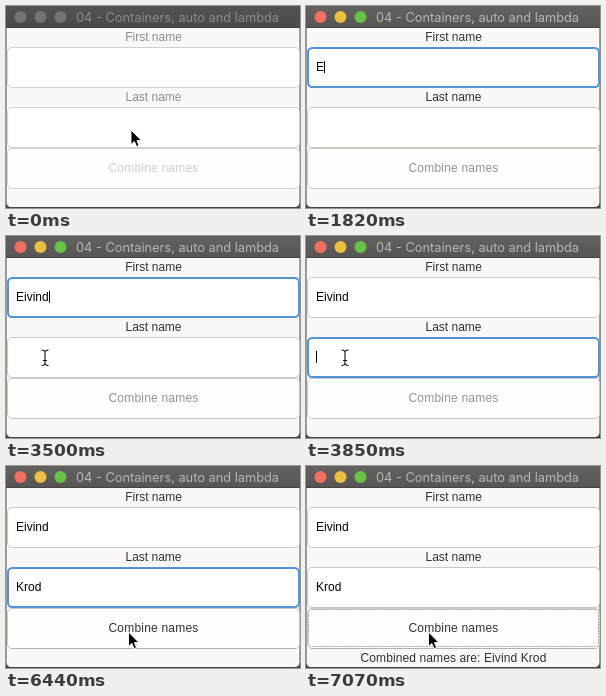
Animation, 294 px wide and 202 px high, one loop 8.05 s. Source, as an HTML page:

```html
<!DOCTYPE html>
<html lang="en">
<head>
<meta charset="utf-8">
<title>Containers, auto and lambda</title>
<style>
  html, body { margin: 0; width: 100%; height: 100%; overflow: hidden; background: #4a4541; }
  svg { display: block; width: 294px; height: 202px; }
  text { font: 12px "Liberation Sans", Arial, sans-serif; white-space: pre; }
  .mid { text-anchor: middle; }
  #title { font: 12.8px Inter, sans-serif; }
  #push { letter-spacing: .2px; }
  #result { letter-spacing: .1px; }
</style>
</head>
<body>
<svg viewBox="0 0 294 202">
  <defs>
    <linearGradient id="bar" x2="0" y2="1">
      <stop id="barTop" offset="0"/><stop id="barEnd" offset="1"/>
    </linearGradient>
    <linearGradient id="face" x2="0" y2="1">
      <stop id="faceTop" offset="0"/><stop id="faceEnd" offset="1"/>
    </linearGradient>
  </defs>
  <rect width="294" height="202" fill="#4a4541"/>
  <path d="M.5 20H293.5V196.5a4.5 4.5 0 0 1-4.5 4.5H5a4.5 4.5 0 0 1-4.5-4.5Z" fill="#f9f8f7"/>
  <rect width="294" height="22" fill="url(#bar)"/>
  <path d="M0 21.5H294" stroke="#454341"/>
  <circle id="close" cx="14.5" cy="11" r="6"/>
  <circle id="mini" cx="34.5" cy="11" r="6"/>
  <circle id="zoom" cx="54.5" cy="11" r="6"/>
  <text id="title" x="70" y="16">04 - Containers, auto and lambda</text>

  <text id="label1" class="mid" x="147.5" y="35">First name</text>
  <rect id="box1" x="1.5" y="41.5" width="292" height="40" rx="4.5" fill="#fff"/>
  <rect id="ring1" x="2" y="42" width="291" height="39" rx="4.5" fill="none" stroke="#5294d6" stroke-width="2"/>
  <text id="first" x="10" y="65"></text>

  <text id="label2" class="mid" x="147.5" y="95">Last name</text>
  <rect id="box2" x="1.5" y="101.5" width="292" height="40" rx="4.5" fill="#fff"/>
  <rect id="ring2" x="2" y="102" width="291" height="39" rx="4.5" fill="none" stroke="#5294d6" stroke-width="2"/>
  <text id="last" x="10" y="125"></text>

  <rect id="button" x="1.5" y="142.5" width="292" height="40" rx="4.5" fill="url(#face)"/>
  <path id="edge" d="M5 182.5H290" stroke="#b8b1aa"/>
  <rect id="dash" x="2.5" y="143.5" width="290" height="37" rx="3" fill="none" stroke="#a4a4a2" stroke-dasharray="2 1"/>
  <text id="push" class="mid" x="147.5" y="165.5">Combine names</text>
  <text id="result" class="mid" x="147.5" y="195.5" fill="#2e3436"></text>

  <path id="caret" stroke="#000"/>
  <path id="arrow" d="M0 0V14.6L3.4 11.5 5.6 16.6 8.1 15.5 5.9 10.6H10.4Z" fill="#000" stroke="#fff" stroke-width=".9"/>
  <g id="beam" fill="none">
    <path d="M-3.5-7.5Q0-7.5 0-5Q0-7.5 3.5-7.5M0-5V5.5M-2 3H2M-3.5 8Q0 8 0 5.5Q0 8 3.5 8" stroke="#fff" stroke-width="2.6"/>
    <path d="M-3.5-7.5Q0-7.5 0-5Q0-7.5 3.5-7.5M0-5V5.5M-2 3H2M-3.5 8Q0 8 0 5.5Q0 8 3.5 8" stroke="#111" stroke-width="1.1"/>
  </g>
</svg>
<script>
const LOOP = 8050, STEP = 70;
const FIRST = "Eivind", LAST = "Krod";
const firstKeys = [1820, 2030, 2100, 2240, 2450, 2520];
const lastKeys = [4550, 4760, 4900, 5040];

const el = {};
document.querySelectorAll("[id]").forEach(e => el[e.id] = e);

const clamp = v => Math.max(0, Math.min(1, v));
const ease = v => v * v * (3 - 2 * v);
const lerp = (a, b, k) => a + (b - a) * k;
const within = (t, a, b) => t >= a && t < b;
// Fade that already shows its first step at time a
const fade = (t, a, b) => clamp((t - a + STEP) / (b - a + STEP));

function mix(a, b, k) {
  const part = (c, i) => parseInt(c.slice(i, i + 2), 16);
  return `rgb(${[1, 3, 5].map(i => Math.round(lerp(part(a, i), part(b, i), k)))})`;
}

const set = (id, name, value) => el[id].setAttribute(name, value);
const show = (id, k) => set(id, "opacity", +k);
const typed = (word, keys, t) => word.slice(0, keys.filter(k => k <= t).length);

function bezier(p, k) {
  const j = 1 - k;
  return [0, 1].map(i =>
    j * j * j * p[0][i] + 3 * j * j * k * p[1][i] + 3 * j * k * k * p[2][i] + k ** 3 * p[3][i]);
}

function pointer(t) {
  if (t < 1820) {
    const k = ease(fade(t, 70, 490));
    return [lerp(125, 90, k), lerp(124, 66, k)];
  }
  if (t < 4550) {
    const k = ease(clamp((t - 2940) / 560));
    return [lerp(90, 39, k), lerp(66.5, 121.5, k)];
  }
  const k = ease(clamp((t - 5740) / 700));
  return bezier([[39, 121], [10, 146], [70, 166], [122.5, 166]], k);
}

function drawCaret(t) {
  const on = within(t, 910, 6860) && !within(t, 6300, 6720);
  show("caret", on);
  if (!on) return;
  const second = t >= 3640;
  const field = second ? el.last : el.first;
  const w = field.textContent ? field.getComputedTextLength() : 0;
  const x = Math.round(10 + w) + .5, y = second ? 115 : 55;
  set("caret", "d", `M${x} ${y}v12`);
}

function drawPointer(t) {
  const [x, y] = pointer(t);
  const visible = t < 1820 || within(t, 2940, 4550) || t >= 5740;
  const isBeam = within(t, 910, 4550) || (t >= 5740 && y < 142);
  for (const id of ["arrow", "beam"]) {
    show(id, visible && (id === "beam") === isBeam);
    set(id, "transform", `translate(${x.toFixed(2)} ${y.toFixed(2)})`);
  }
}

function draw(t) {
  const awake = fade(t, 910, 1050);
  const swap = fade(t, 3640, 3850);
  const ready = fade(t, 4550, 4760);
  const hover = fade(t, 6090, 6300);
  const press = fade(t, 6860, 7070);

  set("barTop", "stop-color", mix("#54514f", "#636261", awake));
  set("barEnd", "stop-color", mix("#4b4846", "#565554", awake));
  set("close", "fill", mix("#757270", "#f1705f", awake));
  set("mini", "fill", mix("#757270", "#eabf42", awake));
  set("zoom", "fill", mix("#757270", "#68c148", awake));
  set("title", "fill", mix("#8d8a87", "#b9b7b5", awake));

  for (const id of ["label1", "label2"]) set(id, "fill", mix("#8b8e8f", "#2e3436", awake));
  for (const id of ["box1", "box2"]) set(id, "stroke", mix("#d5d0cc", "#cdc7c2", awake));
  show("ring1", awake * (1 - swap));
  show("ring2", swap * (1 - press));

  el.first.textContent = typed(FIRST, firstKeys, t);
  el.last.textContent = typed(LAST, lastKeys, t);

  const lit = ready * (1 - hover);
  set("faceTop", "stop-color", mix("#fefefe", "#f6f5f4", lit));
  set("faceEnd", "stop-color", mix("#fdfdfd", "#efedec", lit));
  set("button", "stroke", mix("#d5d0cc", "#cdc7c2", awake));
  show("edge", ready);
  show("dash", press);
  set("push", "fill", ready ? mix("#929595", "#2e3436", ready) : mix("#d2cdca", "#929595", awake));
  el.result.textContent = t >= 6930 ? `Combined names are: ${FIRST} ${LAST}` : "";

  drawCaret(t);
  drawPointer(t);
}

let start;
function tick(now) {
  start ??= now;
  const t = (now - start) % LOOP;
  draw(Math.floor(t / STEP) * STEP);
  requestAnimationFrame(tick);
}
draw(0);
requestAnimationFrame(tick);
</script>
</body>
</html>
```
